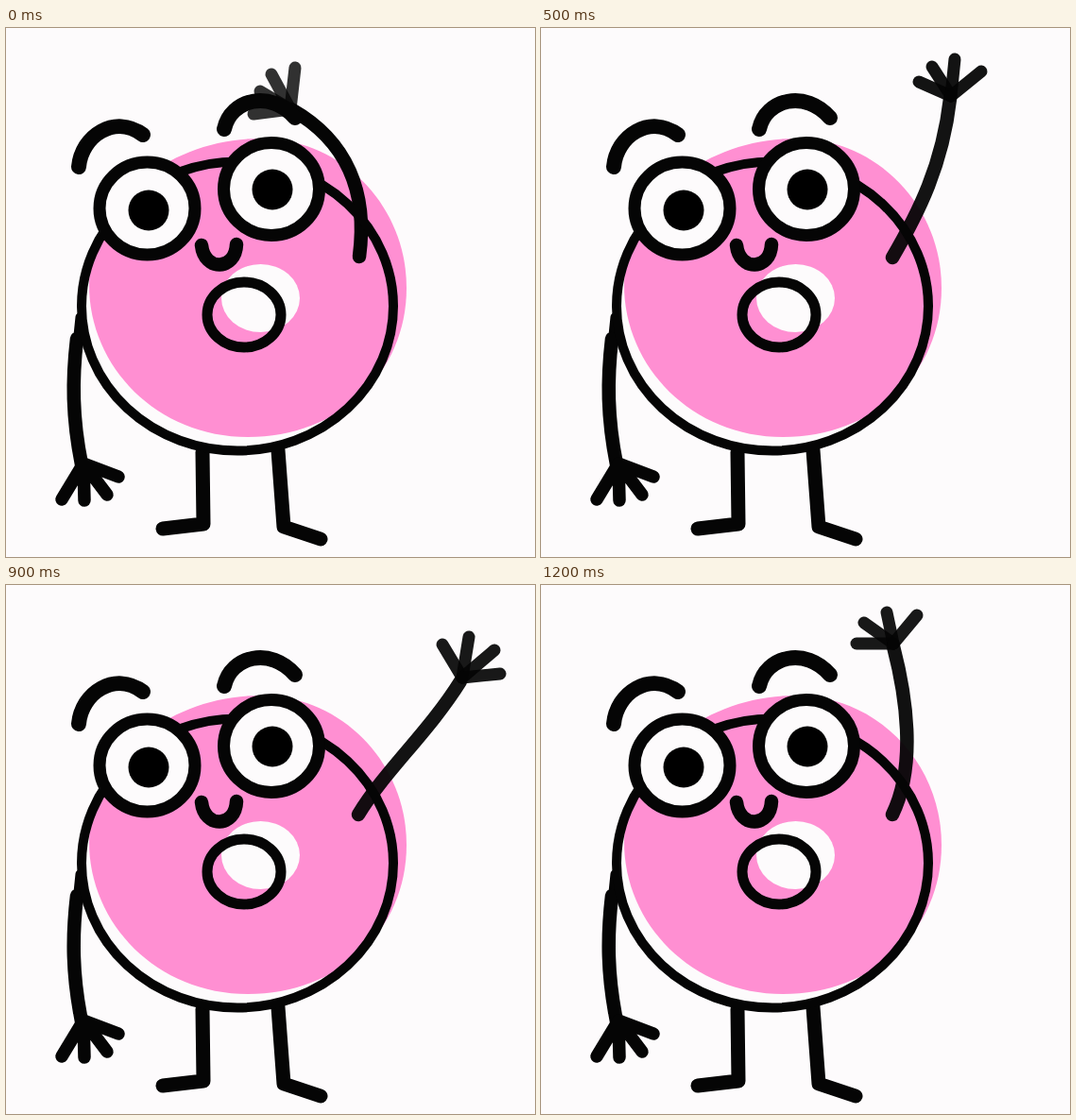
Animation, 560 px wide and 560 px high, one loop 1.3 s. Source, as an HTML page:

```html
<!DOCTYPE html>
<html lang="en">
<head>
<meta charset="utf-8">
<title>Waving doughnut</title>
<style>
  html, body { margin: 0; width: 100%; height: 100%; overflow: hidden; background: #fdfbfc; }
  svg { display: block; width: 100vw; height: 100vh; }
  .ink { fill: none; stroke: #050505; stroke-width: 14.5; stroke-linecap: round; stroke-linejoin: round; }
  .paper { fill: #fdfbfc; }
  .pupil { fill: #000; }
</style>
</head>
<body>
<svg viewBox="0 0 560 560">
  <path fill="#ff8fd2" d="M88 272C88 187 170 117 270 117C355 117 424 188 424 275C424 366 352 433 256 433C160 433 88 359 88 272Z"/>
  <ellipse class="paper" cx="269.5" cy="286" rx="41.5" ry="36"/>

  <g class="ink">
    <path d="M78 306L75 335" stroke-width="9"/>
    <path d="M75 329C70 372 70 412 80 462"/>
    <path d="M59 499L82 461L83 500M82 461L107 494M82 461L119 475" stroke-width="13.5"/>
    <path d="M208 449L209 525L166 530M288 447L294 528L333 541" stroke-width="15"/>
  </g>

  <g id="arm" class="ink"></g>

  <g id="open" class="ink">
    <ellipse cx="245" cy="294.5" rx="165" ry="153" stroke-width="10"/>
    <ellipse cx="252" cy="303.5" rx="39" ry="34.5" stroke-width="11"/>
    <path d="M77 147C80 114 115 91 145 113M231 107C238 75 280 65 306 95" stroke-width="16"/>
    <path d="M207 230C210 258 243 257 244 229"/>
    <g stroke-width="13">
      <ellipse class="paper" cx="149.5" cy="191" rx="50.5" ry="49"/>
      <ellipse class="paper" cx="281" cy="170.5" rx="50.5" ry="49"/>
    </g>
    <g class="pupil" stroke="none">
      <circle cx="151" cy="193" r="21.5"/>
      <circle cx="282" cy="171" r="21.5"/>
    </g>
  </g>

  <g id="closed" class="ink">
    <ellipse cx="238.5" cy="295" rx="164.5" ry="153" stroke-width="10"/>
    <ellipse cx="247" cy="304" rx="39" ry="34.5" stroke-width="11"/>
    <path d="M65 151C68 117 103 95 133 116M217 107C225 75 267 65 293 91"/>
    <path d="M198 229C200 258 234 257 235 227" stroke-width="13.5"/>
    <path d="M91 203L178 188L128 241M291 137L229 181L306 180" stroke-width="17"/>
  </g>
</svg>
<script>
const STEP = 100;

// Each pose: arm curve, wrist, fingertips, opacity of arm and hand.
const poses = {
  brow:  { arm: 'M374 242C383 175 362 120 302 86', wrist: [301, 86], tips: [[262, 91], [269, 67], [281, 49], [306, 42]], ink: [1, .82] },
  left:  { arm: 'M374 241C379 180 358 117 325 76', wrist: [323, 73], tips: [[288, 76], [288, 53], [318, 32], [345, 38]], ink: [.95, .87] },
  up:    { arm: 'M372 243C398 190 386 115 373 65', wrist: [373, 62], tips: [[334, 62], [342, 40], [366, 29], [398, 32]], ink: [.95, .92] },
  right: { arm: 'M372 243C400 195 425 145 433 75', wrist: [434, 72], tips: [[400, 57], [414, 41], [438, 33], [466, 46]], ink: [.94, .94] },
  lean:  { arm: 'M373 243C400 198 448 155 481 102', wrist: [483, 98], tips: [[462, 63], [490, 55], [517, 69], [523, 94]], ink: [.94, .92] },
  out:   { arm: 'M374 243C395 205 455 160 512 137', wrist: [513, 135], tips: [[505, 102], [541, 109], [552, 140], [535, 163]], ink: [.94, .89] }
};

const wave = ['brow', 'up', 'right', 'lean', 'out', 'right',
              'left', 'up', 'right', 'lean', 'out', 'right', 'up'];
const blink = { from: 6, to: 8 };

const byId = id => document.getElementById(id);
const stroke = (d, opacity, width) =>
  `<path d="${d}" opacity="${opacity}" stroke-width="${width}"/>`;

function drawArm({ arm, wrist, tips, ink }) {
  byId('arm').innerHTML = stroke(arm, ink[0], 14.5) +
    tips.map(tip => stroke(`M${wrist}L${tip}`, ink[1], 13)).join('');
}

let shown = -1;
function render(now) {
  const step = Math.floor(now / STEP) % wave.length;
  if (step !== shown) {
    shown = step;
    const shut = step >= blink.from && step <= blink.to;
    byId('open').style.display = shut ? 'none' : '';
    byId('closed').style.display = shut ? '' : 'none';
    drawArm(poses[wave[step]]);
  }
}

const start = performance.now();
function tick() {
  render(performance.now() - start);
  requestAnimationFrame(tick);
}
tick();
</script>
</body>
</html>
```
